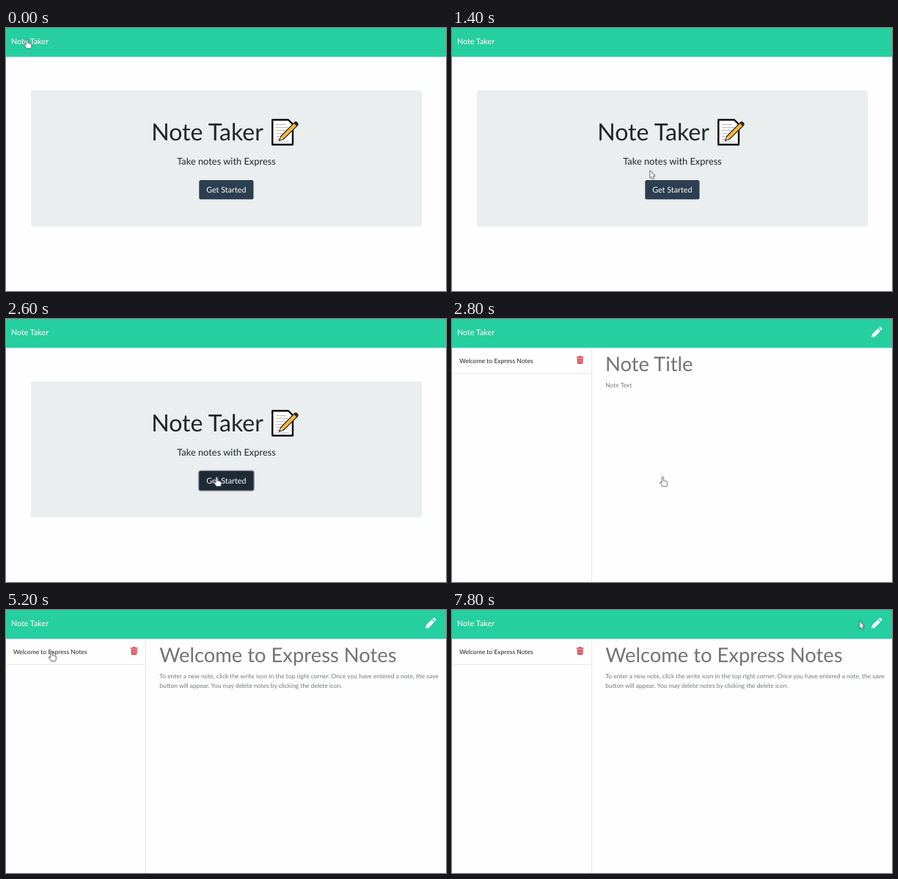
Animation, 600 px wide and 358 px high, one loop 8000 ms. Source, as an HTML page:

```html
<!DOCTYPE html>
<html lang="en">
<head>
<meta charset="utf-8">
<title>Note Taker</title>
<style>
  html, body { margin: 0; width: 100%; height: 100%; overflow: hidden; background: #fefdff; }
  svg { display: block; width: 100%; height: 100%; }
  text { font-family: Lato, sans-serif; font-weight: 400; font-size: 8.53px; fill: #212529; text-rendering: geometricPrecision; }
  .brand, .label { font-size: 10.75px; fill: #fff; }
  .display { font-size: 32.1px; }
  .lead { font-size: 12.85px; }
  .heading { font-size: 27.36px; fill: #747376; }
  .body { font-size: 8.45px; fill: #747a7d; }
  .mid { text-anchor: middle; }

  /* the small negative delay keeps hard changes clear of the tick boundaries */
  .anim { animation: 8s -5ms step-end infinite; }
  .home { animation-name: home; }
  .app { animation-name: app; }
  .blank { animation-name: blank; }
  .filled { animation-name: filled; }
  .button { fill: #2c3e50; animation-name: button; }
  .ring { animation-name: ring; }
  .hand { animation-name: hand; }
  .arrow { animation-name: arrow; }
  .cursor { animation-name: travel; }

  @keyframes home { 0% { opacity: 1 } 35%, 100% { opacity: 0 } }
  @keyframes app { 0% { opacity: 0 } 35%, 100% { opacity: 1 } }
  @keyframes blank { 0% { opacity: 1 } 62.5%, 100% { opacity: 0 } }
  @keyframes filled { 0% { opacity: 0 } 62.5%, 100% { opacity: 1 } }
  @keyframes button { 0% { fill: #2c3e50 } 27.5%, 100% { fill: #1e2b37 } }
  @keyframes ring { 0% { opacity: 0 } 30%, 100% { opacity: 1 } }
  @keyframes hand {
    0%, 27.5%, 52.5% { opacity: 1 }
    2.5%, 40%, 95%, 100% { opacity: 0 }
  }
  @keyframes arrow {
    0%, 27.5%, 52.5% { opacity: 0 }
    2.5%, 40%, 95%, 100% { opacity: 1 }
  }
  @keyframes travel {
    0% { transform: translate(28.5px, 15.5px); animation-timing-function: steps(7) }
    17.5% { transform: translate(270.3px, 194.5px); animation-timing-function: steps(5) }
    30%, 37.5% { transform: translate(287.3px, 215.3px) }
    37.5% { animation-timing-function: steps(6) }
    52.5% { transform: translate(71px, 71px); animation-timing-function: steps(2) }
    57.5%, 67.5% { transform: translate(62px, 57px) }
    67.5% { animation-timing-function: steps(6) }
    82.5% { transform: translate(100px, 64px); animation-timing-function: steps(3) }
    90%, 92.5% { transform: translate(170px, 49px) }
    92.5% { animation-timing-function: steps(2) }
    97.5%, 100% { transform: translate(555.8px, 15.4px) }
  }
</style>
</head>
<body>
<svg viewBox="0 0 600 358" preserveAspectRatio="none">
  <rect width="600" height="358" fill="#fefdff"/>
  <rect width="600" height="39.3" fill="#25cfa0"/>
  <text class="brand" x="6.9" y="22.4">Note Taker</text>

  <g class="anim home">
    <rect x="34" y="85" width="533" height="185" rx="2.5" fill="#eaeeef"/>
    <text class="display" x="198.2" y="153.3">Note Taker</text>
    <g stroke-linejoin="round">
      <path d="M363.3 125H385L391 131V158.8H363.3Z" fill="#fff" stroke="#0b0b0b" stroke-width="2.4"/>
      <path d="M368 131.5h14M368 135.5h17M368 139.5h16M368 143.5h13M368 147.5h9M368 151.5h6M368 155h18" stroke="#b9bcbe" stroke-width="1.2"/>
      <path d="M372.5 153.3l2.6-6.2 18-18.3q2-1.7 4 .2 1.8 1.9.2 3.9l-18.4 18z" fill="#f5b83d" stroke="#171512" stroke-width="1.2"/>
      <path d="M392.5 129.7l4 4 1-1.2q1.3-1.7-.3-3.3-1.7-1.5-3.3-.6z" fill="#2b2926"/>
      <path d="M373.2 152.6l2-4.4 2.8 2.5z" fill="#f6dcae"/>
    </g>
    <text class="lead mid" x="300.5" y="185.9">Take notes with Express</text>
    <rect class="anim ring" x="262" y="205.7" width="77" height="28.8" rx="3.5" fill="#8f979e"/>
    <rect class="anim button" x="263.3" y="207" width="74.2" height="26.3" rx="2.6"/>
    <text class="label mid" x="300.3" y="224.1">Get Started</text>
  </g>

  <g class="anim app">
    <path d="M572 25l.9-4.4 7.6-7.6 3.6 3.6-7.6 7.6zM581.4 12.1l1.3-1.2q1-.8 2 .1l1.3 1.3q1 1 .1 2l-1.2 1.3z" fill="#f6fcfa"/>
    <path d="M190.5 39.3V358M0 74.5H190" stroke="#e9e8ec" fill="none"/>
    <text x="10" y="60">Welcome to Express Notes</text>
    <g fill="#d6454c">
      <path d="M169.8 51.2h2.8l.8-1h2.4l.8 1h2.8v1.5h-9.6z"/>
      <path d="M170.5 53.4h8.2l-.4 6.5q-.1 1-1.1 1h-5.2q-1 0-1.1-1z"/>
    </g>
    <path d="M172.6 54.8v4.7M174.6 54.8v4.7M176.6 54.8v4.7" stroke="#f3c3c8" stroke-width=".7"/>
    <g class="anim blank">
      <text class="heading" x="209" y="70.7">Note Title</text>
      <text class="body" x="209.3" y="93">Note Text</text>
    </g>
    <g class="anim filled">
      <text class="heading" x="209.3" y="70.7">Welcome to Express Notes</text>
      <text class="body" x="209.3" y="93">To enter a new note, click the write icon in the top right corner. Once you have entered a note, the save</text>
      <text class="body" x="209.3" y="105.9">button will appear. You may delete notes by clicking the delete icon.</text>
    </g>
  </g>

  <g class="anim cursor" fill="#fff" stroke="#3d3d42" stroke-width=".8" stroke-linejoin="round">
    <path class="anim hand" d="M-1.2 7V.8a1.2 1.2 0 0 1 2.4 0V5q1.2-.6 1.9.3 1.2-.5 1.8.5 1.3-.2 1.4 1.2V9.5q0 1.8-1 3H-.5q-1.2-2.5-3.2-4.3-.6-1.2.5-1.6 1 0 2 1.3z"/>
    <path class="anim arrow" paint-order="stroke" stroke-width="1.4" d="M0 0V9.2L2 7.4 3.4 10.6 5 9.9 3.6 6.8H6.2Z"/>
  </g>
</svg>
</body>
</html>
```
